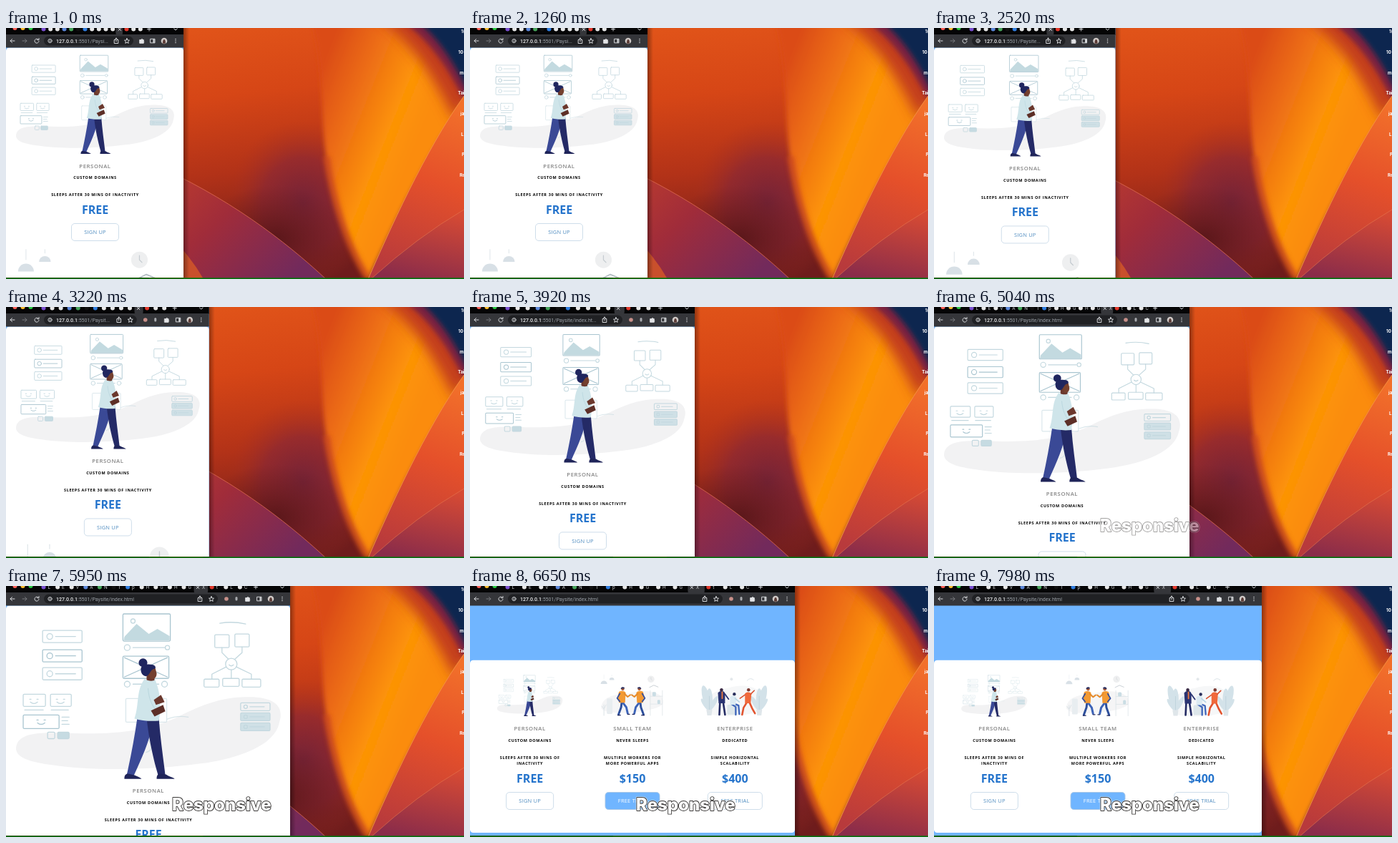
An HTML page that plays this animation: 640x351 px, repeating every 8000 ms.

```html
<!DOCTYPE html>
<html lang="en">
<head>
<meta charset="utf-8">
<title>Responsive pricing page</title>
<style>
html, body { margin: 0; width: 100%; height: 100%; overflow: hidden; background: #000; }
svg { display: block; }
#stage { width: 100%; height: 100%; }
text { white-space: pre; }
.page text { font-family: "Open Sans", sans-serif; text-anchor: middle; }
.title { font-size: 7.7px; letter-spacing: .6px; fill: #858585; font-weight: 600; }
.note { font-size: 5.5px; letter-spacing: .63px; fill: #000; font-weight: 700; }
.price { font-size: 16px; fill: #2574cc; font-weight: 700; }
.btn { font-size: 7.5px; letter-spacing: .2px; fill: #4f8cc0; font-weight: 500; }
.ui { font-family: Roboto, sans-serif; }
.desk text { font: 700 6.2px Inter, sans-serif; fill: #fff; }
#caption text { font: 800 24px Inter, sans-serif; }
.sketch { fill: none; stroke: #c3d8df; stroke-width: 1.3; stroke-linecap: round; stroke-linejoin: round; }
.strong { stroke: #a9c5d0; }
.icon { fill: none; stroke: #d5d7da; stroke-width: 1; stroke-linecap: round; stroke-linejoin: round; }
</style>
</head>
<body>
<svg id="stage" viewBox="0 0 640 351" preserveAspectRatio="none">
<defs>
  <linearGradient id="base" x1="0" y1="0" x2=".2" y2="1">
    <stop offset="0" stop-color="#e4581a"/><stop offset=".35" stop-color="#d64616"/>
    <stop offset=".65" stop-color="#b23218"/><stop offset="1" stop-color="#6e1c1c"/>
  </linearGradient>
  <radialGradient id="dusk">
    <stop offset="0" stop-color="#70223a" stop-opacity=".9"/><stop offset=".55" stop-color="#84263a" stop-opacity=".6"/>
    <stop offset="1" stop-color="#a83020" stop-opacity="0"/>
  </radialGradient>
  <radialGradient id="deep">
    <stop offset="0" stop-color="#521416" stop-opacity=".85"/><stop offset="1" stop-color="#6a1a18" stop-opacity="0"/>
  </radialGradient>
  <linearGradient id="flame" gradientUnits="userSpaceOnUse" x1="440" y1="60" x2="590" y2="120">
    <stop offset="0" stop-color="#db4c17"/><stop offset=".35" stop-color="#ec6c16"/>
    <stop offset=".75" stop-color="#fd9406"/><stop offset="1" stop-color="#fb8c08"/>
  </linearGradient>
  <linearGradient id="right" x1=".7" y1="0" x2=".5" y2="1">
    <stop offset="0" stop-color="#f2702a"/><stop offset=".45" stop-color="#e5502a"/>
    <stop offset="1" stop-color="#b83a3c"/>
  </linearGradient>
  <linearGradient id="inner" x1=".7" y1="0" x2=".4" y2="1">
    <stop offset="0" stop-color="#d64a34"/><stop offset="1" stop-color="#8a2c4a"/>
  </linearGradient>
  <linearGradient id="left" x1="0" y1="0" x2="1" y2=".7">
    <stop offset="0" stop-color="#c4402a"/><stop offset=".5" stop-color="#a02c3a"/>
    <stop offset="1" stop-color="#722a5c"/>
  </linearGradient>
  <linearGradient id="shade">
    <stop offset="0" stop-opacity=".35"/><stop offset="1" stop-opacity="0"/>
  </linearGradient>
  <filter id="soft" x="-20%" y="-20%" width="140%" height="140%"><feGaussianBlur stdDeviation="3"/></filter>
  <filter id="softer" x="-30%" y="-30%" width="160%" height="160%"><feGaussianBlur stdDeviation="9"/></filter>
</defs>

<g id="wallpaper">
  <rect width="640" height="351" fill="url(#base)"/>
  <ellipse cx="415" cy="245" rx="105" ry="115" fill="url(#dusk)"/>
  <ellipse cx="375" cy="295" rx="105" ry="75" fill="url(#deep)"/>
  <path d="M425-20C444 50 440 120 446 170C454 240 480 310 506 352C545 270 590 170 650 90V-20Z" fill="url(#flame)" filter="url(#soft)"/>
  <path d="M448 180C458 250 482 315 505 348" fill="none" stroke="#cf4a1c" stroke-width="10" opacity=".7" filter="url(#soft)"/>
  <path d="M512-20C565 15 602 75 626 128L660 90V-20Z" fill="#c23c1c" filter="url(#softer)"/>
  <path d="M548-14C595 18 620 60 644 108L660 90V-14Z" fill="#7a2440" filter="url(#soft)"/>
  <path d="M570-14C608 16 630 55 650 98L660 90V-14Z" fill="#0a2850" filter="url(#soft)"/>
  <path d="M506 351C535 285 585 172 640 95V351Z" fill="url(#right)"/>
  <path d="M506 351C535 285 585 172 640 95" fill="none" stroke="#f79a48" stroke-width=".8"/>
  <path d="M510 351Q575 292 640 254V351Z" fill="url(#inner)"/>
  <path d="M510 351Q575 292 640 254" fill="none" stroke="#e87a50" stroke-width=".6"/>
  <path d="M200 188C310 236 390 298 447 351H200Z" fill="url(#left)"/>
  <path d="M200 188C310 236 390 298 447 351" fill="none" stroke="#de6a50" stroke-width=".8"/>
  <path d="M200 265Q250 305 276 351H200Z" fill="#c9502c"/>
</g>
<g class="desk" id="desk"></g>
<rect id="shadow" y="0" width="8" height="349" fill="url(#shade)"/>

<svg id="win" height="349">
  <rect width="640" height="349" fill="#70b5ff"/>
  <g id="narrow" class="page"></g>
  <g id="wide" class="page"></g>
  <rect width="640" height="10" fill="#050506"/>
  <g id="tabs"></g>
  <rect y="9" width="640" height="18.500" fill="#35363a"/>
  <circle cx="12.5" cy="0" r="3" fill="#ff5f57"/><circle cx="23.5" cy="0" r="3" fill="#febc2e"/><circle cx="34.5" cy="0" r="3" fill="#28c840"/>
  <g class="icon">
    <path d="M12 18H6M8.500 15.500L6 18L8.500 20.500"/>
    <path d="M23 18H29M26.500 15.500L29 18L26.500 20.500" stroke="#77797d"/>
    <path d="M45.300 16.200A3 3 0 1 0 46 18.500M46 14.500V16.700H43.800"/>
  </g>
  <rect id="pill" x="53" y="11.500" height="13" rx="6.500" fill="#202124"/>
  <g class="icon" stroke-width=".7"><circle cx="61.500" cy="18" r="2.600"/><path d="M61.500 17.800V19.300M61.500 16.600V16.600"/></g>
  <text class="ui" x="70" y="20.600" font-size="7.05" font-weight="500" fill="#f1f3f4">127.0.0.1<tspan id="path" font-weight="400" fill="#9aa0a6"></tspan></text>
  <g id="tools"></g>
</svg>

<rect y="349.300" width="640" height="1.700" fill="#08700f"/>
<g id="caption">
  <text x="232" y="313.500" fill="#fff" stroke="#fff" stroke-width="3.600" stroke-linejoin="round" opacity=".5">Responsive</text>
  <text x="232" y="313.500" fill="#fff" stroke="#3c3a39" stroke-width="1.800" stroke-linejoin="round" paint-order="stroke">Responsive</text>
</g>
</svg>

<script>
const $ = id => document.getElementById(id);
const set = (el, attrs) => { for (const k in attrs) el.setAttribute(k, attrs[k]); };
const LOOP = 8000, STEP = 70, BREAK = 426;
const widthKeys = [[0, 248], [1900, 248], [2520, 253.5], [3920, 314], [5040, 357], [5950, 397],
  [6650, 454], [6900, 456], [7800, 458], [8000, 458]];

function track(keys, t) {
  let i = 1;
  while (i < keys.length - 1 && t > keys[i][0]) i++;
  const [t0, a] = keys[i - 1], [t1, b] = keys[i];
  return a + (b - a) * (t - t0) / (t1 - t0);
}

const box = (x, y, w, h, extra = '') => `<rect x="${x}" y="${y}" width="${w}" height="${h}" rx="1.5" ${extra}/>`;
const dot = (x, y, r, extra = '') => `<circle cx="${x}" cy="${y}" r="${r}" ${extra}/>`;
const path = (d, fill, extra = '') => `<path d="${d}" fill="${fill}" ${extra}/>`;
const limb = (d, color, w) => `<path d="${d}" fill="none" stroke="${color}" stroke-width="${w}" stroke-linecap="round" stroke-linejoin="round"/>`;
const row = (x, y, w, h) => box(x, y, w, h) + dot(x + 10, y + h / 2, 4) + `<path d="M${x + 18} ${y + h / 2}H${x + w - 9}"/>`;

// Walking woman among wireframes, 369 units wide.
function walker() {
  const face = (x, y) => `<path d="M${x - 6} ${y - 2}h2M${x + 4} ${y - 2}h2M${x - 5} ${y + 2}q5 4 10 0"/>`;
  const rows = [62, 89, 114].map((y, i) => `<g class="${i === 1 ? 'strong' : ''}">${row(52, y, 55, 17)}</g>`).join('');
  const stack = [163, 177, 191].map((y, i) =>
    box(328, y, 41, 11, i ? 'fill="#cfe0e6"' : '') + dot(335, y + 5.5, 2.5) + `<path d="M341 ${y + 5.5}h20"/>`).join('');
  return path('M15 228C15 205 45 204 80 205C150 208 195 203 240 183C285 160 310 154 346 155C380 157 388 172 382 190C376 224 320 242 270 248C200 257 120 258 67 250C35 246 17 240 15 228Z', '#f2f2f3')
    + `<g class="sketch">`
    + path('M166 71L183 53L200 67L212 60L229 70V76H165Z', '#c3dae0', 'stroke="none"')
    + `<g class="strong">${box(164, 39, 66, 38)}</g>` + dot(178, 49, 3)
    + dot(170, 86, 4) + '<path d="M178 86h44"/>' + dot(226, 86, 3)
    + `<g class="strong">${box(164, 98, 64, 31)}<path d="M166 100L226 127M226 100L166 127"/></g>`
    + dot(170, 137, 4) + dot(222, 137, 4) + '<path d="M178 137h36"/>'
    + `<g opacity=".6">${box(168, 157, 57, 33)}<path d="M225 186q15-6 30-3M200 215q8 15-4 17"/></g>`
    + rows
    + box(25, 151, 31, 17) + face(40, 160) + box(63, 151, 29, 17) + face(77, 160)
    + `<g class="strong">${box(25, 180, 50, 19)}${face(50, 189)}</g>`
    + '<path d="M27 173h26M64 173h24M79 183h10M79 188h8M79 193h10"/>'
    + box(59, 204, 10, 9) + box(73, 204, 16, 9, 'fill="#c6dbe2"')
    + box(292, 68, 20, 18) + box(320, 67, 20, 18) + dot(315, 109, 8)
    + '<path d="M302 86V93L311 102M330 85V93L320 102M315 117V129M308 113L288 123V130M322 113L343 123V130M299 52q18-3 36 1M312 110q3 3 6 0"/>'
    + box(277, 130, 21, 11) + box(303, 129, 23, 11) + box(330, 130, 26, 11)
    + stack + '</g>'
    + path('M184 184H206C204 212 190 240 179 265H169C175 238 180 212 184 184Z', '#3a4996')
    + path('M197 184H214C216 212 220 238 223 264H213C206 240 200 212 197 184Z', '#242a66')
    + path('M166 269C166 264 168 262 171 262L180 264C184 266 188 267 190 269Z', '#1f2459')
    + path('M211 269C211 264 213 262 216 262L224 263C228 266 234 267 236 269Z', '#1f2459')
    + path('M197 120H208V134H197Z', '#6b382d')
    + path('M194 130C200 133 206 133 209 131C216 148 218 168 214 188C202 189 190 188 180 185C187 166 182 146 194 130Z', '#cfe5ea')
    + limb('M199 143C200 156 204 168 213 176', '#b9d6de', 1)
    + path('M207 159L217 152L222 162L210 166Z', '#6b382d') + path('M203 174L220 166L223 175L208 182Z', '#5d2f27')
    + path('M198 113L209 114L211 122C211 129 206 131 202 129Z', '#74402f')
    + dot(192, 107, 6, 'fill="#20265f"')
    + path('M189 117C188 110 198 108 206 110C211 112 210 116 206 116C202 118 201 125 196 126C191 125 189 121 189 117Z', '#20265f');
}

// The two smaller scenes are 92 units wide, centred on x = 0.
function greeters() {
  const pale = '#dde4e8';
  const lamp = (x, y, r) => limb(`M${x} 0V${y - r}`, pale, .4) + path(`M${x - r} ${y + r / 2}A${r} ${r} 0 0 1 ${x + r} ${y + r / 2}Z`, '#d8e0e6');
  const man = (x, dir) => `<g transform="translate(${x} 18) scale(${dir * .92} .92)">`
    + limb('M0 22L-1 30L-5 41', '#2d4f9c', 3.2) + limb('M1 22L7 30L9 39', '#3c63b8', 3.2)
    + limb('M-6 42H-2M9 40.500H12', '#22285c', 1.4)
    + path('M-4 6C0 4 5 5 6 8L5 23H-4C-6 17-6 10-4 6Z', '#f39a33')
    + limb('M4 9L9 14L13 11', '#e58a2a', 2.2) + limb('M-3 9L-7 16L-3 21', '#37509c', 2)
    + dot(1.500, 2, 2.4, 'fill="#a85e40"') + path('M-1.500 2C-1.500-2 4-2 4.500 1L1 1.500Z', '#252a5c') + '</g>';
  return path('M-44 46C-42 28-20 27-5 26C15 20 44 22 43 39C42 52-42 60-44 46Z', '#f5f5f6')
    + lamp(-40, 10.500, 4.6) + lamp(-29, 5.500, 3.400)
    + dot(26, 6, 4.8, 'fill="#eeeff0"') + limb('M26 3.500V6L27.500 7.500', '#c5cbd0', .5)
    + limb('M25 57V22M42 57V22M25 30H42M25 41H42', pale, .8) + limb('M24 17.500L30 14.500L36 17', '#b4bdc4', .7)
    + box(28, 24, 5, 6, 'fill="#cadde4"') + box(35, 35, 4, 6, 'fill="#cadde4"')
    + limb('M-40 57V42M-43 44L-40 48L-37 42', pale, 1) + box(-36, 33, 8, 22, 'fill="#e8edf0"')
    + man(-15, 1) + man(11, -1);
}

function board() {
  const leaf = (x, a, l) => `<ellipse cx="0" cy="${-l / 2}" rx="${l / 7}" ry="${l / 2}" fill="#d3e2e9" transform="translate(${x} 50) rotate(${a})"/>`;
  const plant = (x, k) => [[-35, 20], [0, 31], [30, 23], [-14, 36]].map(([a, l]) => leaf(x, a * k, l)).join('')
    + limb(`M${x} 56V30`, '#b4cbd5', .6) + path(`M${x - 4} 49h8l-1 8h-6Z`, '#dfe6ea');
  return path('M-40 52C-44 30-30 22-8 18C18 10 44 20 42 42C38 60-32 62-40 52Z', '#f6f7f8')
    + plant(-36, 1) + plant(34, -1) + limb('M17 8q4-5 9-1', '#d3dde3', .8) + dot(-5, 6, 2, 'fill="#e3e8eb"')
    + limb('M-21 36L-22 56M-17 36L-14 56', '#232a63', 2.6) + path('M-24 25C-20 21-15 22-14 26L-14 40H-23Z', '#2b3472')
    + limb('M-18 24V33', '#ef7a3c', 1.8) + limb('M-14 27L-9 34', '#2b3472', 1.8) + dot(-19, 21, 2.300, 'fill="#3a2a45"')
    + box(-11, 42, 14, 14, 'fill="#dde6ea"') + limb('M-2 40L5 43L6 55M-5 41L1 45L1 56', '#3f66bb', 2.3)
    + path('M-7 31C-3 28 1 29 2 32L1 42H-7Z', '#dceaf2') + limb('M0 33L6 38', '#b9d6e6', 1.7) + dot(-1, 27, 2.2, 'fill="#2a2f5c"')
    + limb('M17 38L12 46L10 56M20 38L24 47L28 54', '#e2542f', 2.6) + path('M14 26C17 23 22 24 23 27L22 40H14Z', '#f0693b')
    + limb('M14 28L7 33M22 27L27 22', '#d9502f', 1.6) + dot(19, 21, 2.300, 'fill="#7c3a33"');
}

// y = 0 is the foot of the picture above the text.
function plan(title, domain, lines, price, label, filled) {
  const text = (cls, y, s, extra = '') => `<text class="${cls}" y="${y}" ${extra}>${s}</text>`;
  const dy = (lines.length - 1) * 8.6, w = label.length > 8 ? 76 : 66;
  return text('title', 20, title) + text('note', 35.5, domain)
    + lines.map((s, i) => text('note', 59.5 + i * 8.6, s)).join('')
    + text('price', 83.8 + dy, price)
    + `<rect x="${-w / 2}" y="${97.7 + dy}" width="${w}" height="24" rx="4.500" fill="${filled ? '#70b5ff' : '#fff'}" stroke="${filled ? '#a9c6e2' : '#c9dae8'}" stroke-width=".9"/>`
    + text('btn', 112.5 + dy, label, filled ? 'style="fill:#fff"' : '');
}

const scene1 = `<g transform="scale(${1 / 369}) translate(-199.500 -37)">${walker()}</g>`;
const scene2 = `<g transform="scale(${1 / 92})">${greeters()}</g>`;
const scene3 = `<g transform="scale(${1 / 92})">${board()}</g>`;
const column = (scene, body) => `<g><g>${scene}</g><g>${body}</g></g>`;
const card = '<rect class="card" rx="4.500" fill="#fff"/>';

$('narrow').innerHTML = card
  + column(scene1, plan('PERSONAL', 'CUSTOM DOMAINS', ['SLEEPS AFTER 30 MINS OF INACTIVITY'], 'FREE', 'SIGN UP'))
  + column(scene2, '');
$('wide').innerHTML = card
  + column(scene1, plan('PERSONAL', 'CUSTOM DOMAINS', ['SLEEPS AFTER 30 MINS OF', 'INACTIVITY'], 'FREE', 'SIGN UP'))
  + column(scene2, plan('SMALL TEAM', 'NEVER SLEEPS', ['MULTIPLE WORKERS FOR', 'MORE POWERFUL APPS'], '$150', 'FREE TRIAL', true))
  + column(scene3, plan('ENTERPRISE', 'DEDICATED', ['SIMPLE HORIZONTAL', 'SCALABILITY'], '$400', 'FREE TRIAL'));

$('desk').innerHTML = ['1(', '10', 'm', 'Tai', 'ja', 'L', 'P', 'Re'].map((s, i) =>
  `<text x="${[636, 632, 634, 631.5, 635, 636, 637, 634][i]}" y="${7.2 + i * 28.7}">${s}</text>`).join('');

const tabColors = ['#7a4fd0', '#e8e8e8', '#e8e8e8', '#5b86d8', '#46a35a', '#111', '#2f7de0', '#e8e8e8', '#e8e8e8', '#e8e8e8', '#e8e8e8', '#8a8d91', '#e0382c', '#e8e8e8', '#e8e8e8'];
$('tabs').innerHTML = '<rect y="-4" height="14" rx="3" fill="#35363a"/>'
  + tabColors.map((c, i) => `<g>${i === 11 ? '<path class="icon" d="M-1.800 0L1.800 3.600M1.800 0L-1.800 3.600"/>' : dot(0, 1.5, 3, `fill="${c}"`)}
    <text class="ui" x="6" y="4" font-size="6.500" fill="#c5c7ca">${'LEVANTpHGHGXtLC'[i]}</text></g>`).join('')
  + '<path class="icon" d="M-2.500 1.500H2.500M0-1V4"/><path class="icon" d="M-2.300 1L0 3L2.300 1"/>';

// Each tool: offset from the window's right edge, narrow and wide (null = hidden).
const tools = [
  [94, 126, '<path d="M-1.500-1.500H-2.800V3.500H2.800V-1.500H1.500M0 1V-4M-1.500-2.500L0-4L1.500-2.500"/>'],
  [79, 110, '<path d="M0-3.500L1-1L3.500-.8L1.600.9L2.200 3.400L0 2L-2.200 3.400L-1.600.9L-3.500-.8L-1-1Z"/>'],
  [null, 89, dot(0, 0, 2.8, 'fill="#c9908a" stroke="none"')],
  [null, 75, '<rect x="-1.500" y="-3" width="3" height="5.500" rx="1.500" fill="#a9abaf" stroke="none"/>'],
  [58, 59, '<path d="M-3-1.500H-1A1 1 0 0 1 1-1.500H2.300V.3A1 1 0 0 1 2.300 2V3.300H-3Z" fill="#e4e5e7"/>'],
  [43, 43, '<rect x="-3" y="-2.700" width="6" height="5.500"/><path d="M1.500-2V2" stroke-width="2"/>'],
  [27, 27, dot(0, 0, 4.300, 'fill="#cfc9c6" stroke="none"') + '<path d="M-2 3.800C-2.500-4 2.500-4 2 3.800Z" fill="#5a3b36" stroke="none"/>'],
  [11, 11, '<path d="M0-2.600V-2.600M0 0V0M0 2.600V2.600" stroke-width="1.500"/>']
];
$('tools').innerHTML = tools.map(t => `<g class="icon">${t[2]}</g>`).join('');

function place(col, cx, top, w, textY) {
  set(col.children[0], { transform: `translate(${cx} ${top}) scale(${w})` });
  set(col.children[1], { transform: `translate(${cx} ${textY})` });
}

function drawPage(W) {
  const isWide = W > BREAK;
  $('narrow').style.display = isWide ? 'none' : '';
  $('wide').style.display = isWide ? '' : 'none';
  const [bg, ...cols] = $(isWide ? 'wide' : 'narrow').children;
  if (isWide) {
    set(bg, { y: 103.7, width: W, height: 241.3 });
    const colW = (W - 24) / 3, w = 92 * W / 456;
    cols.forEach((c, i) => place(c, 12 + colW * (i + .5), 124.3, w, 182.2));
  } else {
    const w = W - 27, foot = 37 + w * .628;
    set(bg, { y: 27.5, width: W, height: 400 });
    place(cols[0], W / 2 + .5, 37, w, foot);
    place(cols[1], W / 2, foot + 134, w, 0);
  }
}

function drawChrome(W) {
  const pitch = (W - 103) / 15, roomy = W > 280;
  const parts = [...$('tabs').children], [active, ...rest] = parts;
  set(active, { x: 47 + pitch * 11, width: pitch });
  rest.forEach((el, i) => {
    const x = i < 15 ? 52.5 + pitch * i : i === 15 ? 55 + pitch * 15 : W - 11;
    set(el, { transform: `translate(${x} 0)` });
    if (i < 15) el.lastElementChild.style.display = pitch > 16 ? '' : 'none';
  });
  tools.forEach(([a, b], i) => {
    const off = roomy ? b : a, el = $('tools').children[i];
    el.style.display = off === null ? 'none' : '';
    set(el, { transform: `translate(${W - off} 18)` });
  });
  set($('pill'), { width: W - (roomy ? 101 : 70) - 53 });
  const url = '127.0.0.1:5501/Paysite/index.html';
  const room = W - (roomy ? 126 : 94) - 80;
  const n = Math.floor((room - 7) / 3.25);
  $('path').textContent = room > 112 ? url.slice(9) : url.slice(9, n) + '...';
}

function draw(time) {
  const t = Math.floor((time % LOOP) / STEP) * STEP;
  const W = track(widthKeys, t);
  set($('win'), { width: W });
  set($('shadow'), { x: W });
  drawPage(W);
  drawChrome(W);
  $('caption').style.opacity = Math.min(1, Math.max(0, (t - 4800) / 520));
}

const start = performance.now();
function tick() {
  draw(performance.now() - start);
  requestAnimationFrame(tick);
}
tick();
</script>
</body>
</html>
```
